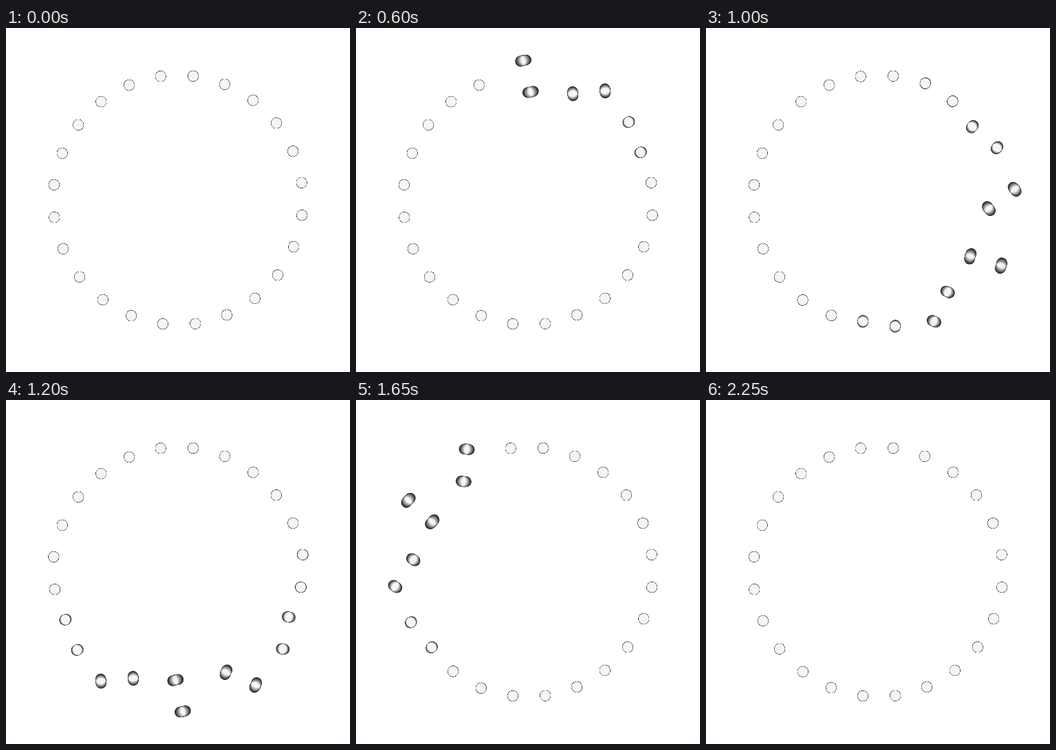
Animation of 500 by 500 pixels, one loop 2400 ms. Source, as an HTML page without scripts:

```html
<!DOCTYPE html>
<html lang="en">
<head>
<meta charset="utf-8">
<title>Turning pairs</title>
<style>
  @property --a { syntax: "<number>"; inherits: true; initial-value: 0; }
  @property --s { syntax: "<number>"; inherits: true; initial-value: 0; }

  html, body { margin: 0; width: 100%; height: 100%; overflow: hidden; background: #fff; }
  svg { display: block; width: 100vw; height: 100vh; }

  /* Seven dim layers add up to one light dot; their soft rims add up to its thin dark outline. */
  .dot { fill: #232323; }
  .pair { isolation: isolate; }
  .layer {
    mix-blend-mode: plus-lighter;
    rotate: calc(var(--dir) * (var(--a) + var(--k) * var(--s)) * 1deg);
  }

  /* Neighbouring pairs turn opposite ways, like gears. */
  .ring > use {
    --dir: 1;
    animation: turn 2400ms step-end infinite;
    animation-delay: calc(var(--i) * 100ms - 4ms);
  }
  .ring > use:nth-child(even) { --dir: -1; }

  /* --a: half turn in degrees, --s: blur step between layers */
  @keyframes turn {
    0%      { --a: 0;     --s: 0; }
    8.333%  { --a: .15;   --s: .03; }
    10.417% { --a: .4;    --s: .1; }
    12.5%   { --a: 1.4;   --s: .24; }
    14.583% { --a: 3.8;   --s: .54; }
    16.667% { --a: 9;     --s: 1.1; }
    18.75%  { --a: 19;    --s: 1.8; }
    20.833% { --a: 34.5;  --s: 2.5; }
    22.917% { --a: 53.8;  --s: 3.05; }
    25%     { --a: 77.4;  --s: 3.45; }
    27.083% { --a: 102.6; --s: 3.45; }
    29.167% { --a: 126.2; --s: 3.05; }
    31.25%  { --a: 145.5; --s: 2.5; }
    33.333% { --a: 161;   --s: 1.8; }
    35.417% { --a: 171;   --s: 1.1; }
    37.5%   { --a: 176.2; --s: .54; }
    39.583% { --a: 178.6; --s: .24; }
    41.667% { --a: 179.6; --s: .1; }
    43.75%, 100% { --a: 180; --s: 0; }
  }
</style>
</head>
<body>
<svg viewBox="0 0 500 500">
  <defs>
    <g id="dots">
      <circle class="dot" cx="-23.7" r="7.7"/>
      <circle class="dot" cx="23.7" r="7.7"/>
    </g>
    <g id="pair" class="pair">
      <use class="layer" href="#dots" style="--k:-3"/>
      <use class="layer" href="#dots" style="--k:-2"/>
      <use class="layer" href="#dots" style="--k:-1"/>
      <use class="layer" href="#dots" style="--k:0"/>
      <use class="layer" href="#dots" style="--k:1"/>
      <use class="layer" href="#dots" style="--k:2"/>
      <use class="layer" href="#dots" style="--k:3"/>
    </g>
  </defs>
  <g class="ring" transform="translate(250 250) rotate(-.5)">
    <use href="#pair" style="--i:0" transform="translate(0 -179.9)"/>
    <use href="#pair" style="--i:1" transform="rotate(30) translate(0 -179.9)"/>
    <use href="#pair" style="--i:2" transform="rotate(60) translate(0 -179.9)"/>
    <use href="#pair" style="--i:3" transform="rotate(90) translate(0 -179.9)"/>
    <use href="#pair" style="--i:4" transform="rotate(120) translate(0 -179.9)"/>
    <use href="#pair" style="--i:5" transform="rotate(150) translate(0 -179.9)"/>
    <use href="#pair" style="--i:6" transform="rotate(180) translate(0 -179.9)"/>
    <use href="#pair" style="--i:7" transform="rotate(210) translate(0 -179.9)"/>
    <use href="#pair" style="--i:8" transform="rotate(240) translate(0 -179.9)"/>
    <use href="#pair" style="--i:9" transform="rotate(270) translate(0 -179.9)"/>
    <use href="#pair" style="--i:10" transform="rotate(300) translate(0 -179.9)"/>
    <use href="#pair" style="--i:11" transform="rotate(330) translate(0 -179.9)"/>
  </g>
</svg>
</body>
</html>
```
